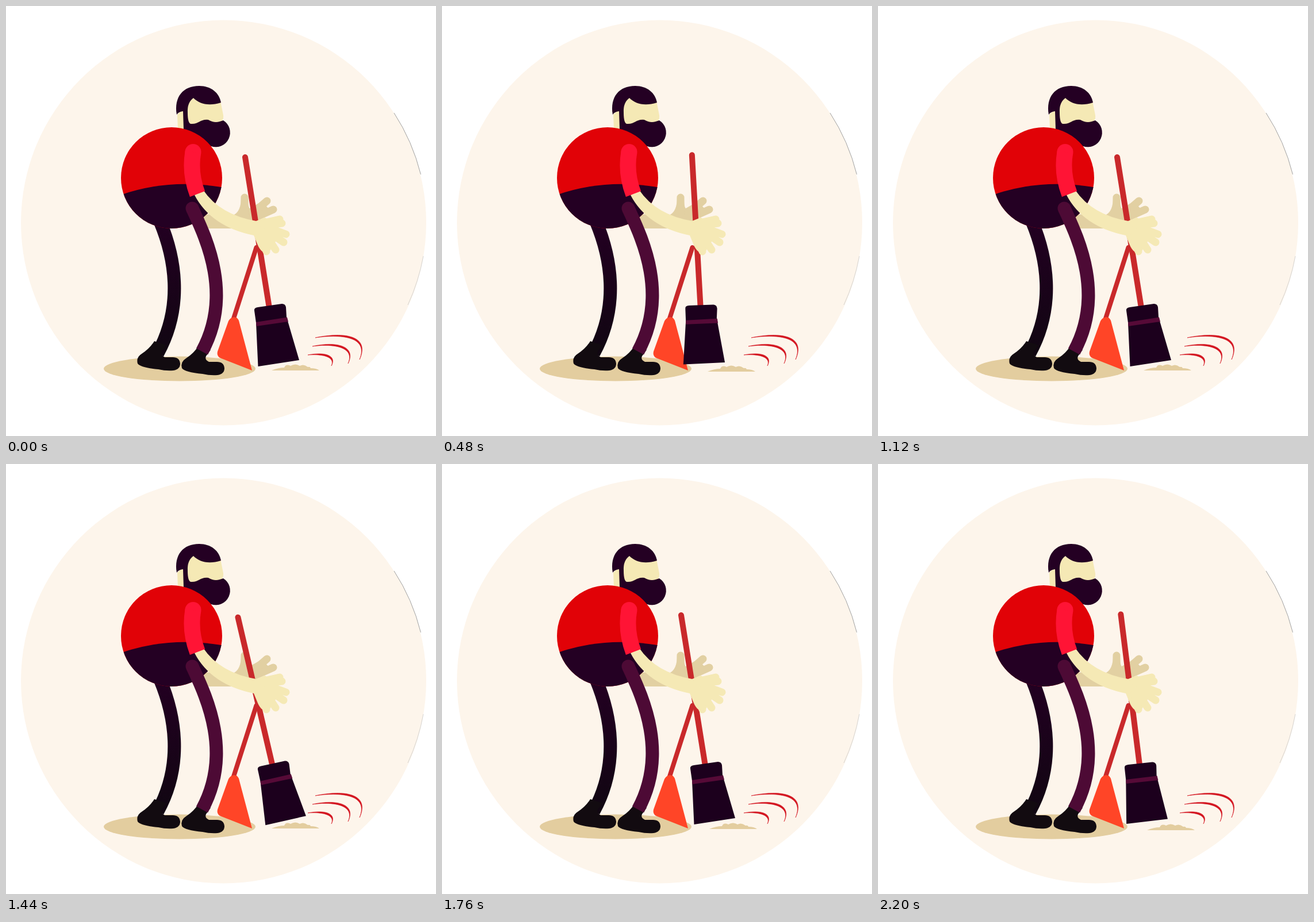
An HTML page that plays this animation: 748 px wide and 748 px high, repeating every 2.28 s.

```html
<!DOCTYPE html>
<html lang="en">
<head>
<meta charset="utf-8">
<title>Sweeping</title>
<style>
html, body { margin: 0; width: 100%; height: 100%; overflow: hidden; background: #fff; }
svg { display: block; width: 100vw; height: 100vh; }
.line { fill: none; }
.skin { fill: #f5e9b5; stroke: #f5e9b5; }
.shade { fill: #e2d0a2; stroke: #e2d0a2; }
.finger { fill: none; stroke-width: 13; stroke-linecap: round; }
.dark { fill: #240023; }
.sand { fill: #e3cd9f; }
.wood { fill: none; stroke: #c9292b; stroke-linecap: round; }
</style>
</head>
<body>
<svg viewBox="0 0 748 748">
  <defs>
    <clipPath id="belly"><circle cx="288" cy="299" r="88"/></clipPath>
    <linearGradient id="trouser" gradientUnits="userSpaceOnUse" x1="0" y1="385" x2="0" y2="600">
      <stop stop-color="#220021"/><stop offset="1" stop-color="#110612"/>
    </linearGradient>
    <path id="shoe" fill="#120b10" d="M258 583Q250 596 236 605Q226 611 229 622Q234 629 265 632Q278 635 291 634Q303 632 303 622Q302 611 290 611L276 611Q268 607 271 601L279 590Z"/>
  </defs>

  <circle cx="378.5" cy="377" r="352.5" fill="#fdf5eb"/>
  <path class="line" stroke="#777" stroke-width=".7" d="M675 186A352.5 352.5 0 0 1 721.5 293"/>
  <path class="line" stroke="#bbb" stroke-width=".6" d="M726 435A352.5 352.5 0 0 1 699 520"/>
  <ellipse class="sand" cx="302" cy="631" rx="132" ry="21.5"/>

  <!-- far arm and hand -->
  <g class="shade" stroke-width="0">
    <path d="M340 362L395 364Q409 358 409 333L421 333Q421 350 424 352L445 340L462 358L436 374L400 387L352 387Z"/>
    <path class="finger" d="M415 363V333M432 358L454 339M438 366L465 354"/>
  </g>

  <!-- dustpan -->
  <path class="wood" stroke-width="8" d="M435.5 420L395.5 545"/>
  <path fill="#ff4527" d="M387 548Q392 539 401 542Q405 545 406 551L428 634L372 612Q366 608 368 601Z"/>

  <path id="dust" class="sand" d="M462 634Q474 629 484 629Q487 622 495 626Q503 621 511 626Q518 622 525 628Q529 627 530 630Q540 630 545 634Z"/>
  <!-- tapered swooshes -->
  <path fill="#d3141f" stroke="#d3141f" stroke-width=".6" d="M538 577C590 566 634 574 615 615C631 577 588 570 538 577M533 592C572 583 611 590 595 622C608 593 570 587 533 592M525 607C555 601 576 608 566 626C573 611 553 605 525 607"/>

  <g id="broom">
    <path class="wood" stroke-width="10" d="M416 263L458 525"/>
    <path fill="#1c001d" d="M432 530Q431 525 438 524L480 518Q486 518 487 524L488 541L510 616L438.5 627L435 551Z"/>
    <path fill="#560a37" d="M435 550L489 541.5L491 549L435.5 557Z"/>
  </g>

  <!-- legs and body -->
  <path class="line" stroke="url(#trouser)" stroke-width="23" d="M268 375C293 435 310 520 264 604"/>
  <use href="#shoe"/>
  <path class="skin" stroke-width="0" d="M298 189L299 215L330 215L360 208Q380 204 378 190L373 165L320 155L306 181Z"/>
  <path class="dark" d="M297 189C292 158 308 139 336 139C357 139 371 151 374 168C352 175 336 170 326 160Q315 168 316 185Q316 205 322 205C335 206 338 196 352 198C362 204 370 202 378 199A25 25 0 0 1 357 244Q330 240 309 215L308 183Q300 184 297 189Z"/>
  <g clip-path="url(#belly)">
    <path fill="#e10207" d="M190 200H390V400H190Z"/>
    <path class="dark" d="M190 332Q285 296 390 318V400H190Z"/>
  </g>
  <use href="#shoe" x="77" y="8"/>
  <circle cx="324" cy="352" r="11.5" fill="#4d0a35"/>
  <path class="line" stroke="#4d0a35" stroke-width="23" d="M324 352C346 400 396 500 341 601"/>

  <!-- near arm and hand -->
  <g class="skin" stroke-width="0">
    <path d="M343 320Q372 363 435 374L450 368L474 381L470 408L456 431Q444 430 438 416L431 399Q357 384 328 329Z"/>
    <path class="finger" d="M445 378L476 371M455 385L487 397M455 392L483 411M450 395L469 424M445 400L453 427M460 380L480 378"/>
  </g>
  <circle cx="325.5" cy="254" r="14" fill="#ff1435"/>
  <path class="line" stroke="#ff1435" stroke-width="28" d="M325.5 254Q319 290 333 327"/>
</svg>
<script>
const STEP = 40, LOOP = 2280;
// One cycle holds two strokes: broom tilt in degrees, dust shift in pixels.
const tilt = [9, 11, 9, 5, 2.6, 4.8, 9.9, 12.5, 13, 11.3, 7, 3.4, 3.1, 7];
const dustX = [0, 1, 3, 4, 3, 1, 0, 0, 0, 1, 2, 1, 0, 6];
const dustY = [0, 0, 1, 2, 2, 2, 2, 1, 0, 1, 2, 2, 2, 3];
const broom = document.getElementById('broom');
const dust = document.getElementById('dust');
const start = performance.now();

function draw() {
  const time = (performance.now() - start) % LOOP;
  const i = Math.min(55, Math.floor(time / STEP)) % tilt.length;
  broom.setAttribute('transform', `rotate(${9 - tilt[i]} 462 444)`);
  dust.setAttribute('transform', `translate(${dustX[i]} ${dustY[i]})`);
  requestAnimationFrame(draw);
}
draw();
</script>
</body>
</html>
```
